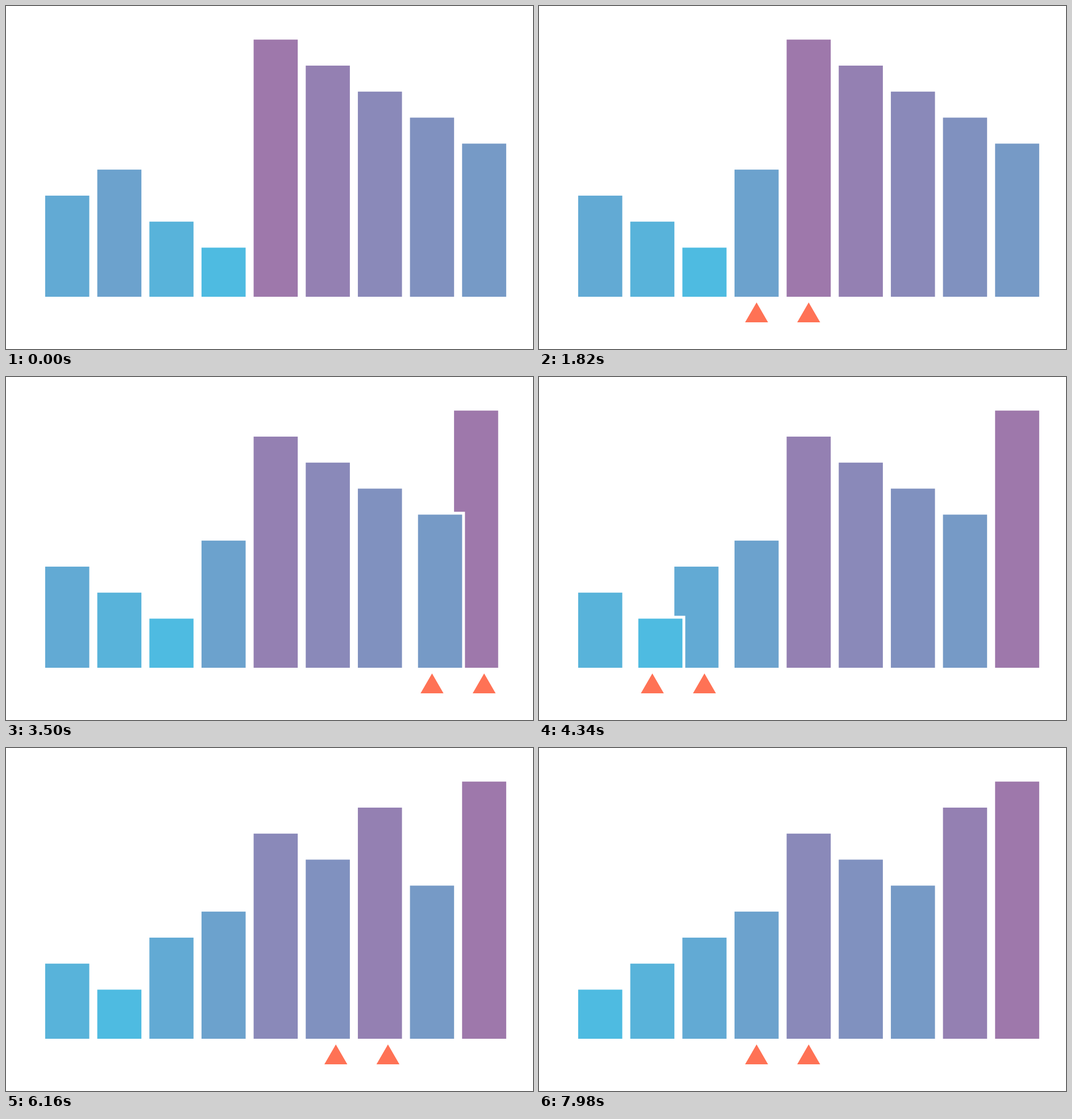
An HTML page with a canvas that plays this animation: 927 by 604 pixels, repeating every 8000 ms.

```html
<!DOCTYPE html>
<html lang="en">
<head>
<meta charset="utf-8">
<title>Bubble sort</title>
<style>
  html, body { margin: 0; width: 100%; height: 100%; overflow: hidden; background: #fff; }
  canvas { display: block; }
</style>
</head>
<body>
<canvas id="stage" width="927" height="604"></canvas>
<script>
const ctx = document.getElementById('stage').getContext('2d');

const LOOP = 8000, TICK = 70;
const START = 3, PHASE = 3, CYCLE = 2 * PHASE; // in ticks
const LEFT = 68.9, STEP = 91.67, WIDTH = 77.6, BASE = 512;
const OUTLINE = 5;
const LOW = [78, 187, 225], HIGH = [158, 120, 171];

const lerp = (a, b, p) => a + (b - a) * p;

// Sigmoid ease, normalised to run from 0 to 1.
function smooth(p) {
  const sig = x => 1 / (1 + Math.exp(-x));
  const err = sig(-5);
  return (sig(10 * (p - 0.5)) - err) / (1 - 2 * err);
}

// One entry per comparison, with the order before it.
function bubbleSort(start) {
  const order = start.slice(), list = [];
  for (let end = order.length - 1; end > 0; end--) {
    for (let i = 0; i < end; i++) {
      const swap = order[i] > order[i + 1];
      list.push({ i, swap, order: order.slice() });
      if (swap) [order[i], order[i + 1]] = [order[i + 1], order[i]];
    }
  }
  return list;
}

const start = [3, 4, 2, 1, 9, 8, 7, 6, 5];
const cycles = bubbleSort(start);

function drawBar(rank, slot) {
  const x = LEFT + slot * STEP;
  const h = 86.5 + (rank - 1) * 45.79;
  const rgb = LOW.map((c, k) => Math.round(lerp(c, HIGH[k], (rank - 1) / 8)));
  ctx.fillStyle = '#fff';
  ctx.fillRect(x - OUTLINE, BASE - h - OUTLINE, WIDTH + 2 * OUTLINE, h + 2 * OUTLINE);
  ctx.fillStyle = `rgb(${rgb})`;
  ctx.fillRect(x, BASE - h, WIDTH, h);
}

function drawPointer(slot) {
  const x = LEFT + WIDTH / 2 + slot * STEP;
  ctx.beginPath();
  ctx.moveTo(x, 522);
  ctx.lineTo(x + 20.2, 557);
  ctx.lineTo(x - 20.2, 557);
  ctx.fill();
}

function draw(tick) {
  ctx.fillStyle = '#fff';
  ctx.fillRect(0, 0, 927, 604);

  const n = Math.floor((tick - START) / CYCLE);
  const cycle = n < 0 ? { i: 0, swap: false, order: start } : cycles[n];
  const local = n < 0 ? 0 : (tick - START) % CYCLE;
  const move = smooth(Math.min(local / PHASE, 1));
  const swap = cycle.swap && local > PHASE ? smooth(local / PHASE - 1) : 0;

  cycle.order.forEach((rank, k) => {
    const shift = k === cycle.i ? swap : k === cycle.i + 1 ? -swap : 0;
    drawBar(rank, k + shift);
  });

  if (n < 0) return;
  const from = n ? cycles[n - 1].i : cycle.i;
  const slot = lerp(from, cycle.i, move);
  ctx.globalAlpha = n ? 1 : move;
  ctx.fillStyle = '#ff7255';
  drawPointer(slot);
  drawPointer(slot + 1);
  ctx.globalAlpha = 1;
}

const origin = performance.now();
function frame() {
  draw(Math.floor(((performance.now() - origin) % LOOP) / TICK));
  requestAnimationFrame(frame);
}
frame();
</script>
</body>
</html>
```
